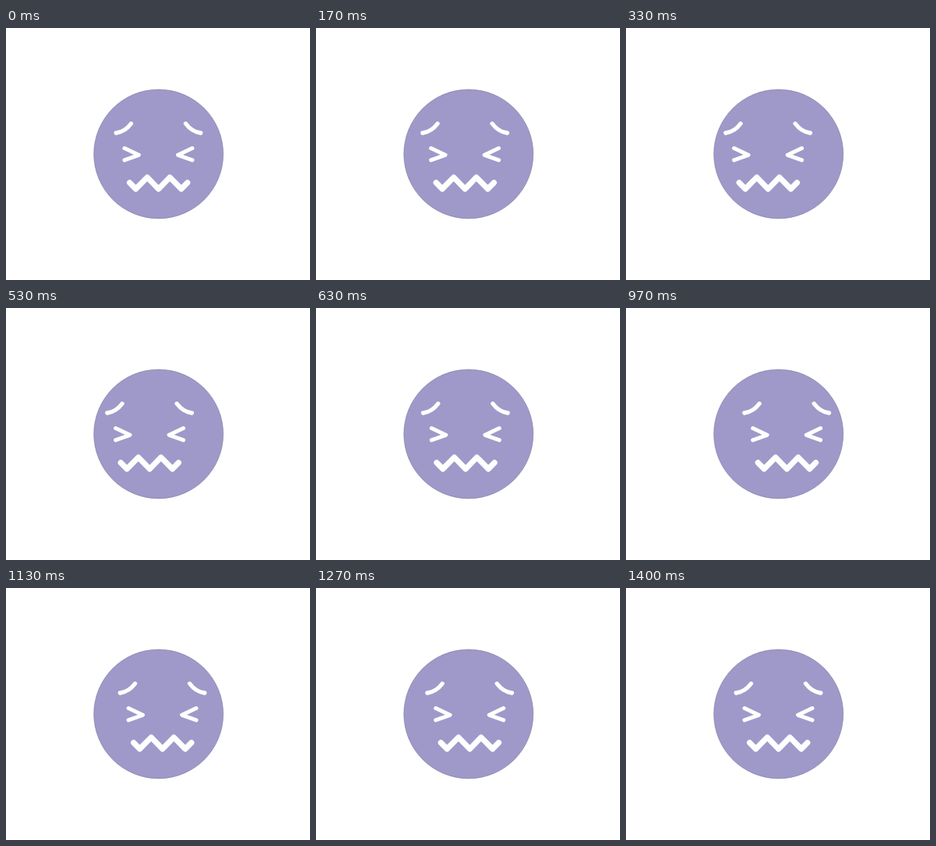
Recreate the animation shown at these times as an HTML page. Size 390 by 324 pixels, loop 2.01 s.

```html
<!DOCTYPE html>
<html lang="en">
<head>
<meta charset="utf-8">
<title>Shaking face</title>
<style>
  html, body { margin: 0; width: 100%; height: 100%; overflow: hidden; background: #fff; }
  svg { display: block; width: 100vw; height: 100vh; }
  #face { fill: none; stroke: #fff; stroke-linecap: round; stroke-linejoin: round; }
</style>
</head>
<body>
<svg viewBox="0 0 390 324">
  <circle cx="195.7" cy="162" r="83" fill="#9e99c9" stroke="#6c688c" stroke-width=".5"/>
  <g id="face">
    <g stroke-width="5.4">
      <path d="M141.2 135Q152.5 133.5 160.4 123"/>
      <path d="M249.8 135Q238.5 133.5 230.6 123"/>
    </g>
    <g stroke-width="5">
      <path d="M152 154.6L170.4 163.3L152 169.9"/>
      <path d="M239 154.6L220.6 163.3L239 169.9"/>
    </g>
    <path stroke-width="7.2" d="M158.6 198.9L166.5 206.9L181.2 192L195.7 206.9L210.2 192L224.9 206.9L232.8 198.9"/>
  </g>
</svg>
<script>
const LOOP = 2010;
const LEFT = -19, RIGHT = 14;
const KEYS = [0, 13, 26, 42];
const face = document.getElementById('face');

const bezier = (t, a, b) => 3 * t * (1 - t) ** 2 * a + 3 * t * t * (1 - t) * b + t ** 3;

// Slow start, then constant speed
function easeIn(x) {
  let lo = 0, hi = 1;
  for (let i = 0; i < 24; i++) {
    const mid = (lo + hi) / 2;
    if (bezier(mid, 1 / 3, 5 / 6) < x) lo = mid; else hi = mid;
  }
  return bezier(lo, 0, 5 / 6);
}

// 30 steps per second, on a 10 ms clock
function stepAt(ms) {
  const rest = ms % 100;
  return Math.floor(ms / 100) * 3 + (rest >= 70 ? 2 : rest >= 30 ? 1 : 0);
}

function shift(n) {
  const [a, b, c, d] = KEYS;
  if (n < b) return LEFT * easeIn((n - a) / (b - a));
  if (n < c) return LEFT + (RIGHT - LEFT) * (n - b) / (c - b);
  if (n < d) return RIGHT * easeIn((d - n) / (d - c));
  return 0;
}

function draw(ms) {
  face.setAttribute('transform', `translate(${shift(stepAt(ms)).toFixed(3)} 0)`);
}

let start;
function tick(now) {
  start ??= now;
  draw((now - start) % LOOP);
  requestAnimationFrame(tick);
}
draw(0);
requestAnimationFrame(tick);
</script>
</body>
</html>
```
